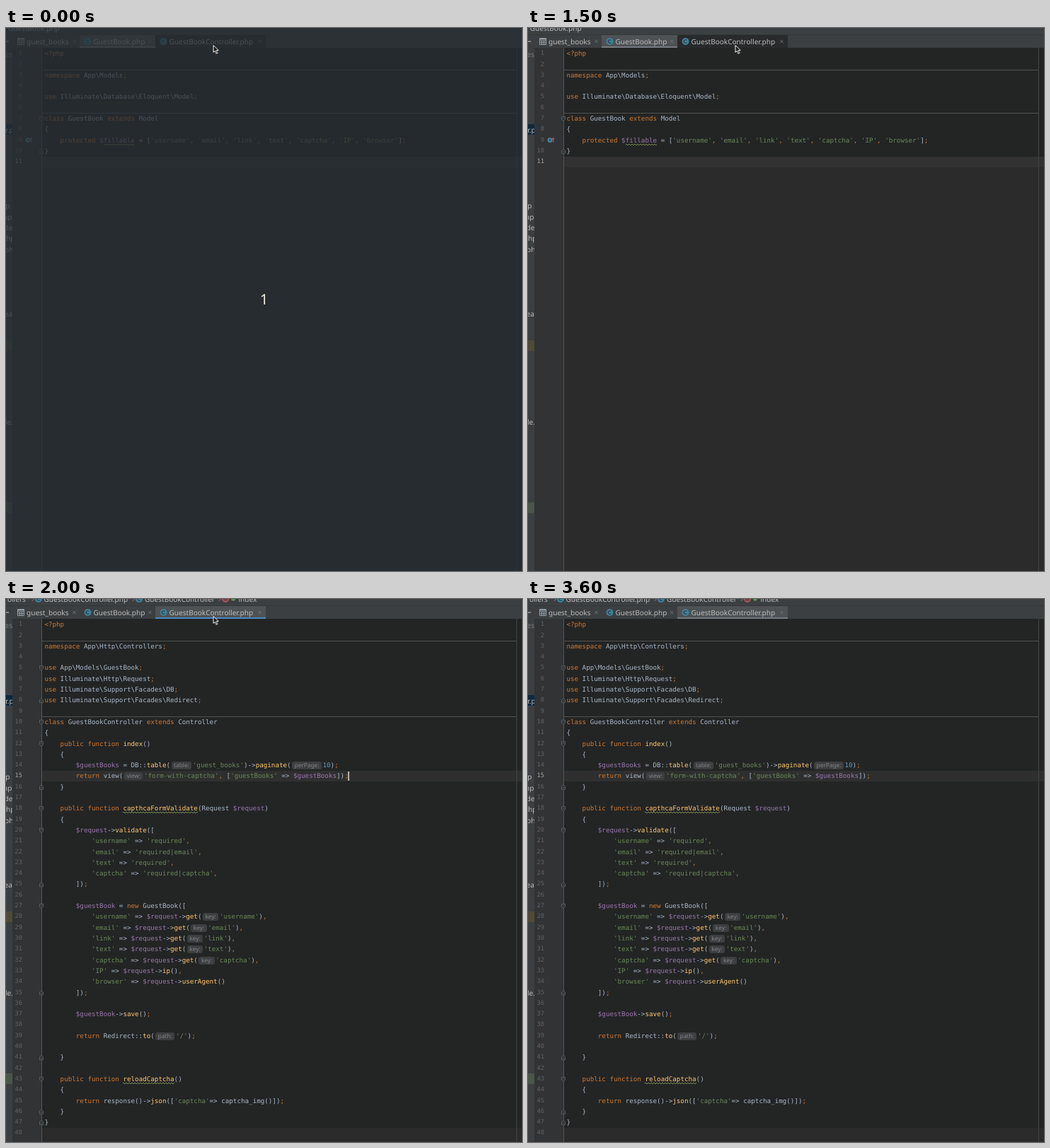
An HTML page that plays this animation: 729 by 768 pixels, repeating every 3700 ms.

```html
<!DOCTYPE html>
<html lang="en">
<head>
<meta charset="utf-8">
<title>Editor tabs</title>
<style>
  html, body { margin: 0; width: 100%; height: 100%; overflow: hidden; background: #2b2b2b; }
  #stage {
    position: absolute; left: 0; top: 0; width: 729px; height: 768px; overflow: hidden;
    background: #2b2b2b; color: #bbb; text-rendering: geometricPrecision;
    font: 10.05px/16px "Noto Sans", "Open Sans", sans-serif;
  }
  #stage div, #stage svg { position: absolute; }
  .layer { left: 0; top: 0; width: 729px; height: 768px; }
  .text, .line, .num { white-space: pre; }
  .line, .num { font: 9.22px/15.3px "DejaVu Sans Mono", "Noto Sans Mono", monospace; color: #a9b7c6; }
  .line { left: 54.4px; }
  .num { right: 706px; font-size: 8.7px; color: #606366; }
  .num.now { color: #a4a3a3; }
  .k { color: #cc7832; } .s { color: #6a8759; } .v { color: #9876aa; }
  .f { color: #ffc66d; } .n { color: #6897bb; }
  .h {
    font: 8.3px/10px "Noto Sans", "Open Sans", sans-serif; color: #828486;
    background: #3c3e3f; border-radius: 3px; margin: 0 1.6px; padding: 0 3.4px;
  }
  u {
    text-decoration: none; padding-bottom: 1px;
    background:
      linear-gradient(45deg, #0000 35%, #7c8f52 35% 65%, #0000 65%) 0 100% / 4px 2px repeat-x,
      linear-gradient(135deg, #0000 35%, #7c8f52 35% 65%, #0000 65%) 2px 100% / 4px 2px repeat-x;
  }
  #side { left: 0; top: 28px; width: 9px; height: 740px; overflow: hidden; background: #3c3f41; }
  #tip {
    left: 292px; top: 38px; width: 297px; height: 20px; border: 1px solid #636567;
    background: #4b4d4d; font-size: 8.85px; line-height: 20px; text-indent: 7px; white-space: pre;
  }
  #dim { background: rgba(38, 44, 50, .75); }
  #dim div { left: 0; width: 729px; top: 368px; line-height: 32px; text-align: center; font-size: 20.5px; color: #eeeade; }
  #caret { left: 483px; top: 244px; width: 2px; height: 13px; background: #b4b4b4; }
  #mouse { left: 0; top: 0; overflow: visible; }

  #first, #second, #tip, #dim, #caret, #crumbA, #crumbB, #blur, #mouse, #arrow, #beam {
    animation: 3700ms step-end infinite;
  }
  #first { animation-name: first; }
  #second { animation-name: second; }
  #tip { animation-name: tip; }
  #dim { animation-name: dim; }
  #caret { animation-name: caret; }
  #crumbA { animation-name: crumbA; }
  #crumbB { animation-name: crumbB; }
  #blur { animation-name: blur; }
  #mouse { animation-name: move; }
  #arrow { animation-name: arrow; }
  #beam { animation-name: beam; }
  @keyframes first { 0% { visibility: visible } 43.243%, 100% { visibility: hidden } }
  @keyframes second { 0% { visibility: hidden } 43.243%, 100% { visibility: visible } }
  @keyframes tip { 0%, 40.54%, 100% { visibility: hidden } 13.513% { visibility: visible } }
  @keyframes dim { 0% { visibility: visible } 2.702%, 100% { visibility: hidden } }
  @keyframes caret {
    0%, 56.756%, 83.783%, 97.297%, 100% { visibility: hidden }
    43.243%, 70.27%, 94.594% { visibility: visible }
  }
  @keyframes crumbA { 0% { visibility: visible } 54.054%, 100% { visibility: hidden } }
  @keyframes crumbB { 0% { visibility: hidden } 54.054%, 100% { visibility: visible } }
  @keyframes blur { 0% { visibility: hidden } 97.297%, 100% { visibility: visible } }
  @keyframes move {
    0% { transform: translate(292.5px, 24px) }
    62.162% { transform: translate(276px, 44px) }
    64.864% { transform: translate(239px, 62px) }
    67.567% { transform: translate(201.7px, 75px) }
    70.27% { transform: translate(170px, 78px) }
    72.972% { transform: translate(140px, 72px) }
    75.675% { transform: translate(115px, 58px) }
    78.378% { transform: translate(92px, 41px) }
    81.081% { transform: translate(70px, 20px) }
    83.783%, 100% { transform: translate(51px, 2px) }
  }
  @keyframes arrow {
    0%, 81.081% { visibility: visible }
    62.162%, 86.486%, 100% { visibility: hidden }
  }
  @keyframes beam {
    0%, 81.081%, 100% { visibility: hidden }
    62.162% { visibility: visible }
  }
</style>
</head>
<body>
<div id="stage">
  <div id="first" class="layer"></div>
  <div id="second" class="layer"></div>
  <div id="caret"></div>
  <div id="side"></div>
  <div id="bar" class="layer">
    <div id="crumbA" class="layer"></div>
    <div id="crumbB" class="layer"></div>
  </div>
  <div id="tip">~/Midis-Guest-Book/app/Http/Controllers/GuestBookController.php</div>
  <div id="dim" class="layer"><div>1</div></div>
  <svg id="mouse" width="10" height="16">
    <path id="arrow" d="M.5.5V10.4L2.9 8.3 4.6 12.3 6.4 11.5 4.7 7.6H7.8Z" fill="#1c1c1c" stroke="#f2f2f2"/>
    <path id="beam" d="M-3-5.5H-1L0-4.5 1-5.5H3M0-4.5V4.5M-3 5.5H-1L0 4.5 1 5.5H3" fill="none" stroke="#ddd" stroke-width="1.3"/>
  </svg>
</div>
<script>
const ROW = 15.304, TOP = 28.9;
const $ = id => document.getElementById(id);
const rowTop = n => TOP + (n - 1) * ROW;

function add(parent, cls, css, html = '') {
  const el = document.createElement('div');
  el.className = cls;
  el.style.cssText = css;
  el.innerHTML = html;
  parent.append(el);
  return el;
}
const box = (parent, x, y, w, h, color) =>
  add(parent, '', `left:${x}px;top:${y}px;width:${w}px;height:${h}px;background:${color}`);
const label = (parent, x, y, str, color = '#bbb') =>
  add(parent, 'text', `left:${x}px;top:${y - 8}px;color:${color}`, str);
const draw = (parent, shapes) =>
  parent.insertAdjacentHTML('beforeend', `<svg class="layer" width="729" height="768" fill="none">${shapes}</svg>`);

const TOKEN = /(&lt;\?php|\b(?:namespace|use|class|extends|protected|public|function|return|new)\b|[,;])|('[^']*')|(\$\w+)|(?<=->|::|function )(\w+)|\{(\w+:)\}|\b(10)\b/g;
function highlight(line) {
  return line.replace(/</g, '&lt;').replace(TOKEN, (all, ...groups) => {
    const i = groups.slice(0, 6).findIndex(g => g !== undefined);
    const body = groups[i].replace(/fillable|capthca\w+|reloadCaptcha/, '<u>$&</u>');
    return `<span class="${'ksvfhn'[i]}">${body}</span>`;
  });
}

function fold(n, closing) {
  const y = rowTop(n) + ROW / 2, d = closing ? -1 : 1;
  return `<path d="M47.5 ${y - 3 * d}h5v${4 * d}l-2.5 ${2 * d}l-2.5 ${-2 * d}zM48.8 ${y - .5 * d}h2.4" fill="#2b2d2e" stroke="#66696b" stroke-width=".8"/>`;
}

function editor(view, { code, php, now, nowColor, rules, opens, closes }) {
  box(view, 9, 28, 41, 740, '#313335');
  box(view, 50, 28, 679, rowTop(php + 1) - 28, '#232525');
  box(view, 50, rowTop(now), 679, ROW, nowColor);
  rules.forEach(n => box(view, 50, rowTop(n) - .6, 672, 1, '#505252'));
  box(view, 50, 28, 1, 740, '#515354');
  box(view, 721, 28, 1, 740, '#414344');
  code.split('\n').forEach((line, i) => {
    const top = `top:${rowTop(i + 1) + .3}px`;
    add(view, i + 1 === now ? 'num now' : 'num', top, i + 1);
    add(view, 'line', top, highlight(line));
  });
  draw(view, opens.map(n => fold(n)).join('') + closes.map(n => fold(n, true)).join(''));
}

editor($('first'), {
  php: 10, now: 11, nowColor: '#323232', rules: [3, 7], opens: [7], closes: [10],
  code: String.raw`<?php

namespace App\Models;

use Illuminate\Database\Eloquent\Model;

class GuestBook extends Model
{
    protected $fillable = ['username', 'email', 'link', 'text', 'captcha', 'IP', 'browser'];
}
`
});

editor($('second'), {
  php: 47, now: 15, nowColor: '#2f2f2f', rules: [3, 10],
  opens: [5, 10, 12, 18, 20, 27, 43], closes: [8, 16, 25, 35, 41, 46, 47],
  code: String.raw`<?php

namespace App\Http\Controllers;

use App\Models\GuestBook;
use Illuminate\Http\Request;
use Illuminate\Support\Facades\DB;
use Illuminate\Support\Facades\Redirect;

class GuestBookController extends Controller
{
    public function index()
    {
        $guestBooks = DB::table({table:}'guest_books')->paginate({perPage:}10);
        return view({view:}'form-with-captcha', ['guestBooks' => $guestBooks]);
    }

    public function capthcaFormValidate(Request $request)
    {
        $request->validate([
            'username' => 'required',
            'email' => 'required|email',
            'text' => 'required',
            'captcha' => 'required|captcha',
        ]);

        $guestBook = new GuestBook([
            'username' => $request->get({key:}'username'),
            'email' => $request->get({key:}'email'),
            'link' => $request->get({key:}'link'),
            'text' => $request->get({key:}'text'),
            'captcha' => $request->get({key:}'captcha'),
            'IP' => $request->ip(),
            'browser' => $request->userAgent()
        ]);

        $guestBook->save();

        return Redirect::to({path:}'/');

    }

    public function reloadCaptcha()
    {
        return response()->json(['captcha'=> captcha_img()]);
    }
}
`
});

// Override marker beside the property
draw($('first'), `<circle cx="31" cy="158.6" r="2.6" stroke="#4593b0" stroke-width="1.6"/>
  <path d="M29.6 158.6h2.8" stroke="#4593b0"/>
  <path d="M35.7 162v-6.5m-1.7 2l1.7-2 1.7 2" stroke="#c75450" stroke-width="1.1"/>`);

// Project tree, cut off by the window edge
const side = $('side');
box(side, 0, 108, 9, 15, '#0d293e');
box(side, 0, 414, 9, 15, '#4f4a38');
box(side, 0, 643, 9, 15, '#49574a');
[['es', -1.5, 37, '#7b7e80'], ['r.php', -.8, 144], ['p', -.8, 251], ['hp', -4, 267], ['de', -2.5, 282],
 ['hp', 0, 297], ['php', -2, 312.5], ['ea', -2.5, 404], ['le.', -1, 557]]
  .forEach(([str, x, y, color]) => label(side, x, y - 28, str, color));

// Navigation bar and tabs
const bar = $('bar');
const classIcon = (x, y) => `<circle cx="${x}" cy="${y}" r="5" fill="#3f819a"/>
  <path d="M${x + 1.7} ${y - 1.6}a2.3 2.3 0 1 0 0 3.2" stroke="#22363e" stroke-width="1.1"/>`;
const cross = x => `<path d="M${x - 2.2} 16.8l4.4 4.4m0-4.4l-4.4 4.4" stroke="#75787a" stroke-width=".9"/>`;
const chevron = x => `<path d="M${x - 1.2}-3l2.6 3-2.6 3" stroke="#7c7f81"/>`;
const underline = (parent, x, w, color) => box(parent, x, 26, w, 2, color);

function tab(parent, x, w, fill, line) {
  box(parent, x, 10, w, 18, fill);
  if (line) underline(parent, x, w, line);
}
const base = document.createElement('div');
base.className = 'layer';
bar.prepend(base);
box(base, 0, 0, 729, 28, '#3c3f41');
box(base, 0, 9, 729, 1, '#343738');

for (const [id, tabs] of [
  ['first', [[104, 107, '#4e5254', '#747a80'], [211, 156, '#282a2b']]],
  ['second', [[211, 156, '#4e5254', '#4a88c7']]]
]) {
  const layer = add(base, 'layer', `animation:${id} 3700ms step-end infinite`);
  tabs.forEach(t => tab(layer, ...t));
}
underline(base, 211, 156, '#747a80').id = 'blur';

label(base, 29, 19, 'guest_books');
label(base, 123.5, 19, 'GuestBook.php');
label(base, 230.5, 19, 'GuestBookController.php');
draw(base, classIcon(115.5, 19) + classIcon(222.5, 19) + [96.5, 203.3, 358.5].map(cross).join('') +
  `<path d="M0 19h4" stroke="#afb1b3" stroke-width="1.2"/>
   <path d="M16.5 15h9v8.5h-9zM16.5 18h9M16.5 20.8h9M19.5 18v5.5M22.5 18v5.5" stroke="#9aa7b0" stroke-width=".9"/>
   <path d="M16 15.4h10" stroke="#9aa7b0" stroke-width="2"/>`);

label($('crumbA'), 2.7, 0, 'GuestBook.php');
const crumbs = $('crumbB');
label(crumbs, -2, 0, 'rollers');
label(crumbs, 53.5, 0, 'GuestBookController.php');
label(crumbs, 196, 0, 'GuestBookController');
label(crumbs, 328.5, 0, 'index');
draw(crumbs, [38, 180, 302].map(chevron).join('') + classIcon(46, 0) + classIcon(188, 0) +
  `<circle cx="310" cy="0" r="5" fill="#a8545c"/>
   <path d="M308 2.5v-3h4v3M310-.5v3" stroke="#3a2a2c" stroke-width=".9"/>
   <circle cx="321" cy="0" r="2.8" fill="#58934f"/>`);
</script>
</body>
</html>
```
